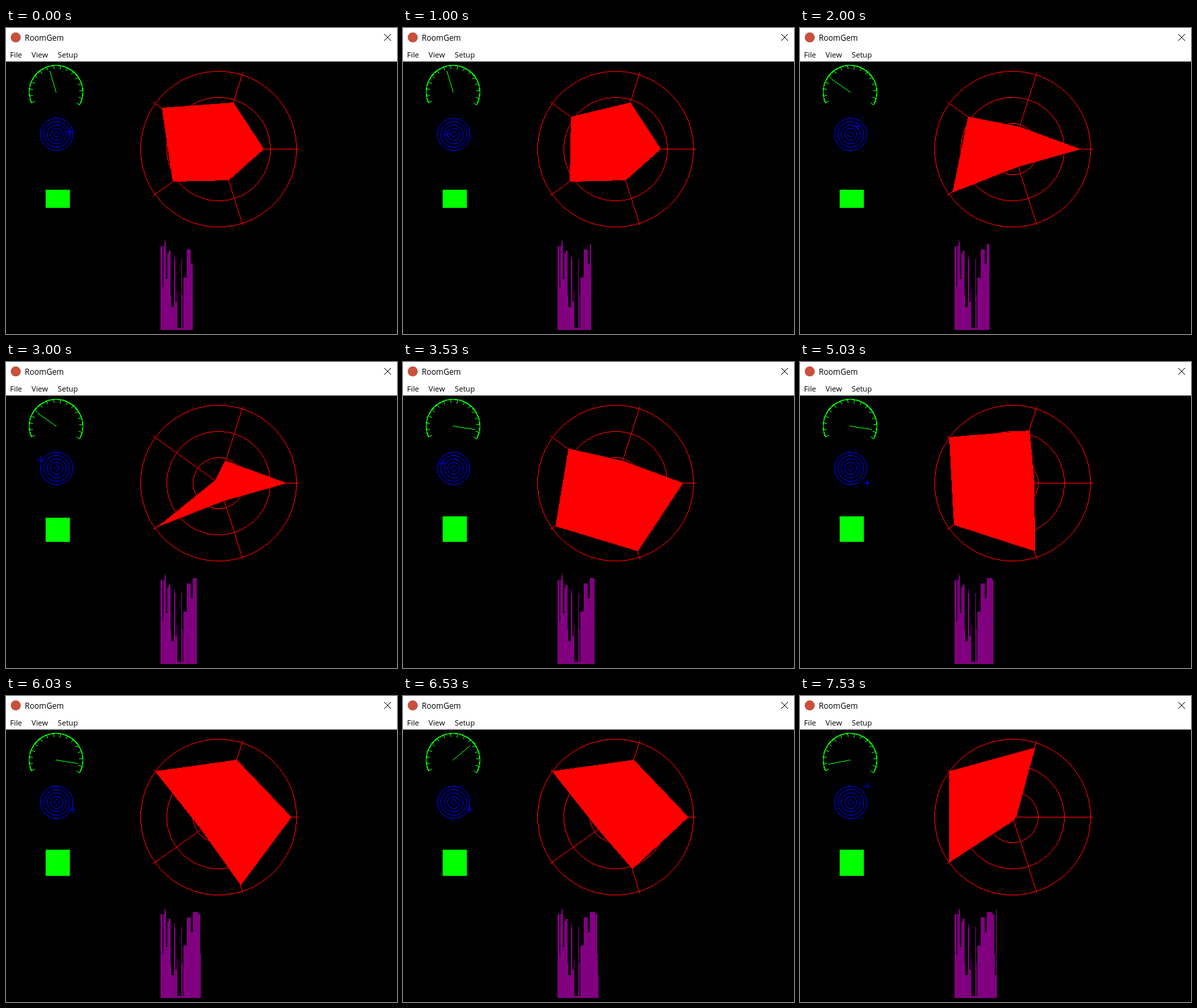
Animation, 582 px wide and 456 px high, one loop 8000 ms. Source, as an HTML page with a canvas:

```html
<!DOCTYPE html>
<html lang="en">
<head>
<meta charset="utf-8">
<title>RoomGem</title>
<style>
  html, body { margin: 0; width: 100%; height: 100%; overflow: hidden; background: #000; }
  canvas { display: block; }
</style>
</head>
<body>
<canvas id="stage" width="582" height="456"></canvas>
<script>
const ctx = document.getElementById('stage').getContext('2d');
const LOOP = 8000;
const TAU = Math.PI * 2;
const FONT = '"Open Sans", "Noto Sans", sans-serif';
const DIAL = { x: 74, y: 95 };
const TARGET = { x: 75, y: 158 };
const RADAR = { x: 316, y: 180 };

// Each step lists only what changes: radar radii, needle degrees,
// cross position, top of the level box, right edge of the history.
const changes = [
  { at: 0, radii: [67, 72, 103, 83, 49], needle: -106, cross: [95, 154], level: 241, end: 278 },
  { at: 1000, radii: [67, 72, 81, 83, 49], cross: [66, 158], end: 280 },
  { at: 1500, radii: [67, 34, 81, 109, 28], needle: -10, end: 281 },
  { at: 2000, radii: [100, 34, 81, 109, 28], needle: 215, cross: [85, 146], end: 282 },
  { at: 2500, radii: [100, 34, 42, 109, 28], level: 232, end: 283 },
  { at: 3000, radii: [100, 34, 6, 109, 28], cross: [51, 145], end: 284 },
  { at: 3530, radii: [100, 34, 86, 109, 107], needle: 9, cross: [59, 150], level: 230, end: 285 },
  { at: 4030, radii: [32, 34, 86, 109, 107], cross: [87, 180], end: 286 },
  { at: 4530, radii: [32, 34, 115, 107, 107], cross: [90, 175], end: 287 },
  { at: 5030, radii: [32, 82, 115, 107, 107], cross: [100, 180], end: 288 },
  { at: 6030, radii: [108, 89, 115, 31, 107], cross: [99, 169], level: 229, end: 290 },
  { at: 6530, radii: [108, 89, 115, 31, 81], needle: -41, end: 291 },
  { at: 7030, radii: [5, 112, 115, 75, 6], end: 292 },
  { at: 7530, radii: [5, 108, 115, 115, 6], needle: 169, cross: [100, 134], end: 293 }
];
const states = [];
for (const c of changes) states.push({ ...states[states.length - 1], ...c });

// History runs: left edge, top
const history = [
  [230, 325], [233, 386], [234, 325], [236, 316], [237, 319], [238, 374],
  [240, 336], [242, 332], [245, 399], [246, 416], [250, 339], [251, 345],
  [252, 408], [254, 392], [255, 447], [261, 344], [262, 398], [263, 447],
  [264, 372], [269, 330], [275, 352], [278, 322], [286, 325], [289, 384],
  [290, 416], [292, 318]
];

const dot = (x, y) => ctx.fillRect(Math.round(x), Math.round(y), 1, 1);

// Points snap down to whole pixels.
const polar = (c, deg, r) => {
  const a = deg * TAU / 360;
  return [Math.floor(c.x + r * Math.cos(a)), Math.floor(c.y + r * Math.sin(a))];
};

// Lines and circles are plotted pixel by pixel to keep hard edges.
function line([x0, y0], [x1, y1]) {
  const n = Math.max(1, Math.abs(x1 - x0), Math.abs(y1 - y0));
  for (let i = 0; i <= n; i++) {
    dot(x0 + (x1 - x0) * i / n, y0 + (y1 - y0) * i / n);
  }
}

function ring(c, r) {
  for (let d = 0; d <= r * 0.72; d++) {
    const e = Math.round(Math.sqrt(r * r - d * d));
    for (const sx of [-1, 1]) {
      for (const sy of [-1, 1]) {
        dot(c.x + sx * d, c.y + sy * e);
        dot(c.x + sx * e, c.y + sy * d);
      }
    }
  }
}

function polygon(points) {
  const ys = points.map(p => p[1]);
  for (let y = Math.min(...ys); y <= Math.max(...ys); y++) {
    const hits = [];
    points.forEach(([x0, y0], i) => {
      const [x1, y1] = points[(i + 1) % points.length];
      if ((y0 <= y) !== (y1 <= y)) {
        hits.push(x0 + (y - y0) * (x1 - x0) / (y1 - y0));
      }
    });
    hits.sort((a, b) => a - b);
    for (let i = 0; i + 1 < hits.length; i += 2) {
      const left = Math.round(hits[i]);
      ctx.fillRect(left, y, Math.round(hits[i + 1]) - left, 1);
    }
  }
  points.forEach((p, i) => line(p, points[(i + 1) % points.length]));
}

function text(str, x, y, size) {
  ctx.font = `${size}px ${FONT}`;
  ctx.fillText(str, x, y);
}

function drawWindow() {
  ctx.fillStyle = '#000';
  ctx.fillRect(0, 0, 582, 456);
  ctx.fillStyle = '#fff';
  ctx.fillRect(0, 0, 582, 49);
  ctx.fillStyle = '#f0f0f0';
  ctx.fillRect(0, 49, 582, 1);
  ctx.fillStyle = '#c8503c';
  ctx.beginPath();
  ctx.arc(14.5, 14, 7.5, 0, TAU);
  ctx.fill();
  ctx.fillStyle = '#000';
  text('RoomGem', 28, 19, 11.7);
  text('File', 6, 44, 11.3);
  text('View', 38, 44, 11.3);
  text('Setup', 77, 44, 11.2);
  ctx.strokeStyle = '#000';
  ctx.lineWidth = 1;
  ctx.beginPath();
  ctx.moveTo(563, 9);
  ctx.lineTo(573, 19);
  ctx.moveTo(573, 9);
  ctx.lineTo(563, 19);
  ctx.stroke();
}

function drawDial(needle) {
  const from = 156, to = 388, ticks = 15;
  const mid = { x: DIAL.x + 0.5, y: DIAL.y + 0.5 };
  ctx.fillStyle = '#0f0';
  for (let a = from; a <= to; a += 0.5) {
    dot(...polar(mid, a, 40));
    dot(...polar(mid, a, 39.6));
  }
  for (let i = 0; i <= ticks; i++) {
    const a = from + (to - from) * i / ticks;
    line(polar(mid, a, 35), polar(mid, a, 40));
  }
  line([DIAL.x, DIAL.y], polar(mid, needle, 32.5));
}

function drawTarget([x, y]) {
  ctx.fillStyle = '#00f';
  for (let r = 4; r <= 24; r += 5) ring(TARGET, r);
  ctx.fillRect(x - 5, y, 10, 1);
  ctx.fillRect(x, y - 5, 1, 10);
}

function drawRadar(radii) {
  ctx.fillStyle = '#f00';
  for (const r of [38, 77, 116]) ring(RADAR, r);
  radii.forEach((_, i) => line([RADAR.x, RADAR.y], polar(RADAR, -72 * i, 119)));
  polygon(radii.map((r, i) => polar(RADAR, -72 * i, r)));
}

function drawHistory(end) {
  ctx.fillStyle = '#800080';
  history.forEach(([x, top], i) => {
    const next = i + 1 < history.length ? history[i + 1][0] : end;
    const right = Math.min(next, end);
    if (right > x) ctx.fillRect(x, top, right - x, 450 - top);
  });
}

function draw(now) {
  const t = now % LOOP;
  const s = states.filter(state => state.at <= t).pop();
  drawWindow();
  drawDial(s.needle);
  drawTarget(s.cross);
  ctx.fillStyle = '#0f0';
  ctx.fillRect(59, s.level, 36, 268 - s.level);
  drawRadar(s.radii);
  drawHistory(s.end);
}

const start = performance.now();
function tick() {
  draw(performance.now() - start);
  requestAnimationFrame(tick);
}
tick();
</script>
</body>
</html>
```
